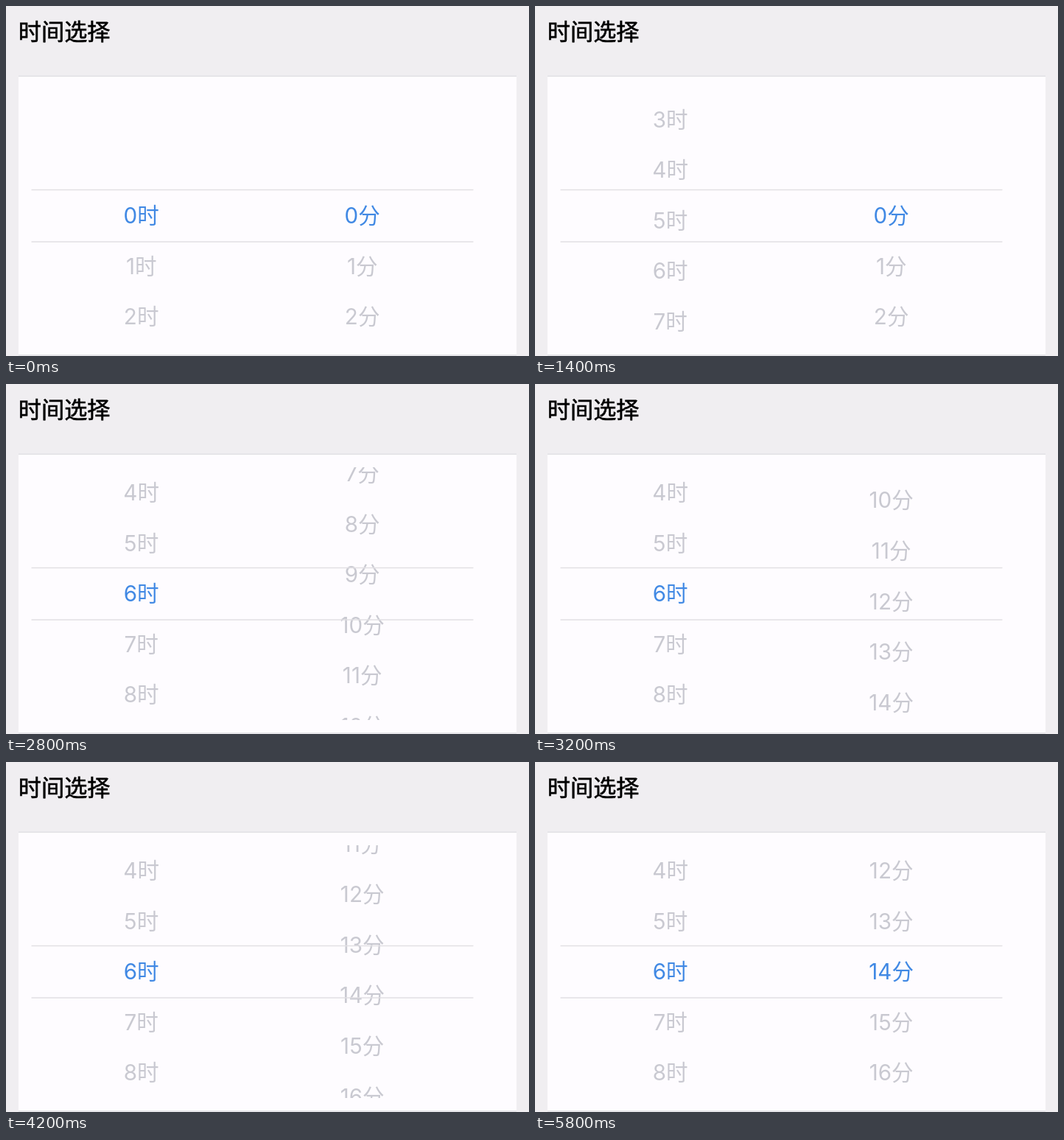
Animation, 710 px wide and 475 px high, one loop 6000 ms. Source, as an HTML page:

```html
<!DOCTYPE html>
<html lang="zh-CN">
<head>
<meta charset="utf-8">
<title>时间选择</title>
<style>
  html, body { margin: 0; width: 100%; height: 100%; overflow: hidden; background: #f0eef1; }
  svg { display: block; }
  text { font-family: Inter, "Noto Sans CJK SC", "Noto Sans CJK", sans-serif; }
  .title { font-size: 31.2px; stroke: #000; stroke-width: .6px; }
  .wheel text { font-size: 29.6px; text-anchor: middle; fill: #c9c9d1; }
  .wheel text.on { fill: #4189e4; }
</style>
</head>
<body>
<svg width="710" height="475" viewBox="0 0 710 475">
  <clipPath id="view"><rect x="35" y="113" width="600" height="343"/></clipPath>
  <text class="title" x="16.8" y="46">时间选择</text>
  <rect x="17" y="95" width="676" height="379" fill="#fefcff"/>
  <path d="M17 95.2H693M17 473.8H693" stroke="#e2e1e5" stroke-width="1.6"/>
  <g class="wheel" clip-path="url(#view)"><g id="hours"/><g id="minutes"/></g>
  <path d="M34.5 249.5H634.5M34.5 320H634.5" stroke="#e1e0e4" stroke-width="1.6"/>
</svg>
<script>
const LOOP = 6000, STEP = 200, ROW = 68.6, BASELINE = 295.2;

function makeWheel(id, x, unit, count) {
  const group = document.getElementById(id);
  for (let i = 0; i < count; i++) {
    const label = document.createElementNS("http://www.w3.org/2000/svg", "text");
    label.setAttribute("x", x);
    label.setAttribute("y", BASELINE + i * ROW);
    label.textContent = i + unit;
    group.append(label);
  }
  return (position, selected) => {
    group.setAttribute("transform", `translate(0 ${-position * ROW})`);
    [...group.children].forEach((label, i) => label.classList.toggle("on", i === selected));
  };
}

const setHours = makeWheel("hours", 183.7, "时", 24);
const setMinutes = makeWheel("minutes", 483.7, "分", 60);

function smooth(t, start, end) {
  const u = Math.min(1, Math.max(0, (t - start) / (end - start)));
  return u * u * (3 - 2 * u);
}

// A flick that slows down, then snaps to the nearest row.
function minuteAt(t) {
  const rest = 0.225 + 4.395 * Math.exp((2.8 - t) / 0.485);
  return Math.max(0, 14 - rest * (1 - smooth(t, 4.8, 5.4)));
}

function draw(now) {
  const t = Math.floor((now % LOOP) / STEP) * STEP / 1000;
  setHours(6 * smooth(t, 0.6, 1.7), t < 1.8 ? 0 : 6);
  setMinutes(minuteAt(t), t < 5.4 ? 0 : 14);
}

const start = performance.now();
function tick() {
  draw(performance.now() - start);
  requestAnimationFrame(tick);
}
tick();
</script>
</body>
</html>
```
